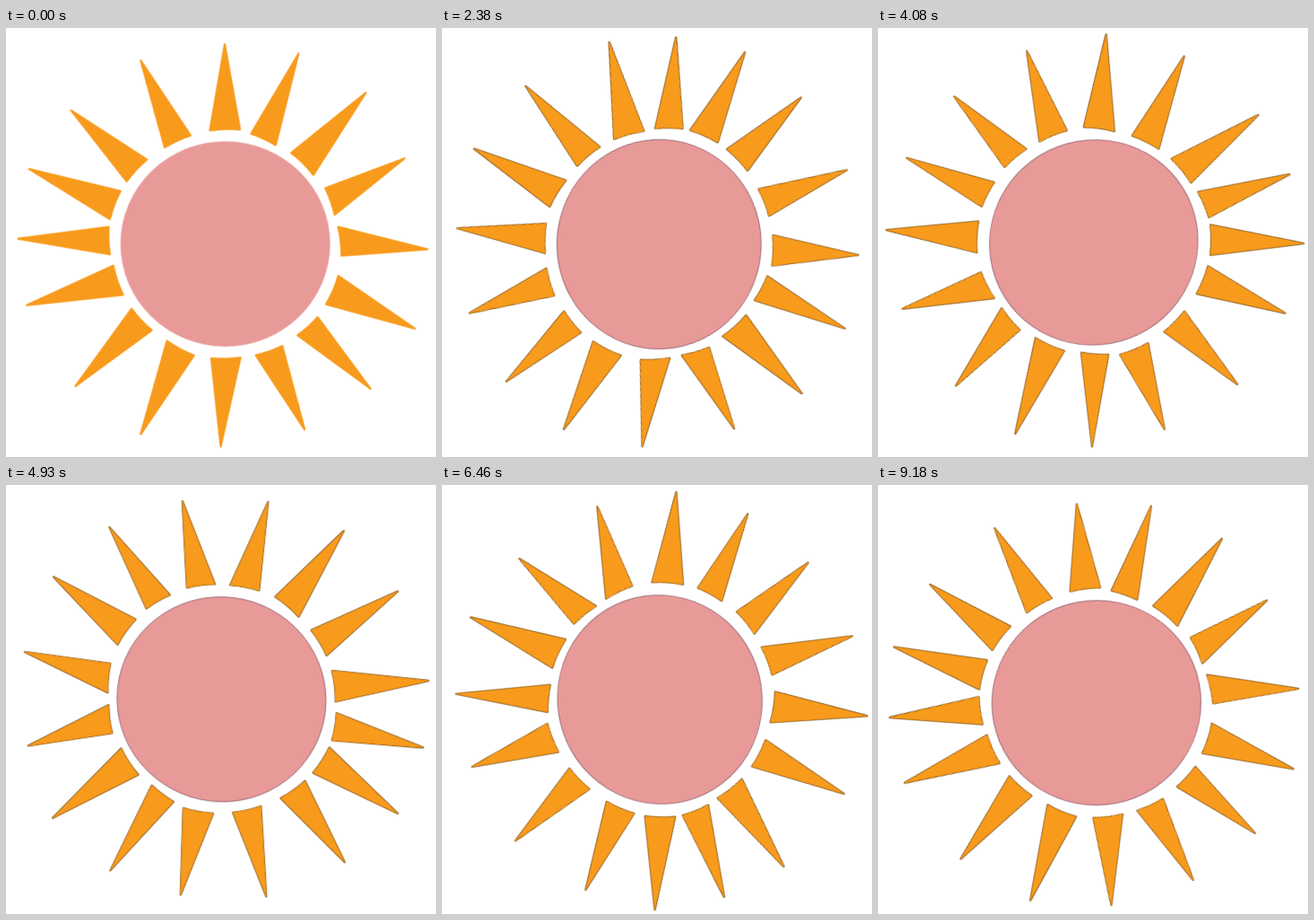
An HTML page without scripts for the animation above (9.35 s loop, 480x478 px).

```html
<!DOCTYPE html>
<html lang="en">
<head>
<meta charset="utf-8">
<title>Turning sun</title>
<style>
  html, body { margin: 0; width: 100%; height: 100%; overflow: hidden; background: #fff; }
  svg { display: block; width: 100%; height: 100%; }

  .sun { --orange: #f89b1c; --pink: #e89a99; animation: turn 9350ms -1ms infinite; }
  .rays { fill: var(--orange); stroke: var(--orange); stroke-width: .9; stroke-linejoin: round; }
  .edge { stroke: #70450f; stroke-width: 2.1; }
  .disc { fill: var(--pink); stroke: #7d4a58; stroke-width: .7; }
  .edge, .disc { animation: bare 9350ms -1ms step-end infinite; }
  .edge { --bare: var(--orange); }
  .disc { --bare: var(--pink); }

  /* One turn in 55 held poses, with a slight wobble of the centre. */
  @keyframes turn {
    0%        { transform: translate(244.3px, 241.3px) rotate(-192deg);  animation-timing-function: steps(8); }
    14.54545% { transform: translate(242.5px, 243.4px) rotate(-139deg);  animation-timing-function: steps(11); }
    34.54545% { transform: translate(240.9px, 238px) rotate(-65.2deg);   animation-timing-function: steps(10); }
    52.72727% { transform: translate(241.2px, 238.2px) rotate(0deg);     animation-timing-function: steps(9); }
    69.09091% { transform: translate(244px, 239.3px) rotate(58.5deg);    animation-timing-function: steps(7); }
    81.81818% { transform: translate(243.8px, 243px) rotate(105.5deg);   animation-timing-function: steps(9); }
    98.18182% { transform: translate(243.4px, 243.4px) rotate(162.5deg); animation-timing-function: steps(1); }
    100%      { transform: translate(244.3px, 241.3px) rotate(168deg); }
  }

  /* The first pose has no dark outline. */
  @keyframes bare {
    0% { stroke: var(--bare); }
    1.81818% { animation-timing-function: step-end; }
  }
  .edge { animation-name: bare-rays; }
  .disc { animation-name: bare-disc; }
  @keyframes bare-rays { 0% { stroke: #f89b1c; } 1.81818%, 100% { stroke: #70450f; } }
  @keyframes bare-disc { 0% { stroke: #e89a99; } 1.81818%, 100% { stroke: #7d4a58; } }
</style>
</head>
<body>
<svg viewBox="0 0 480 478" preserveAspectRatio="none">
  <defs>
    <g id="rays" transform="scale(1.006)">
      <path d="M9 -126 L51 -218 L41 -120 A127 127 0 0 0 9 -126Z"/>
      <path d="M59 -113 L135 -186 L85 -91 A127 127 0 0 0 59 -113Z"/>
      <path d="M99 -76 L195 -119 L116 -48 A127 127 0 0 0 99 -76Z"/>
      <path d="M122 -31 L229 -20 L126 3 A127 127 0 0 0 122 -31Z"/>
      <path d="M127 16 L223 54 L122 46 A127 127 0 0 0 127 16Z"/>
      <path d="M119 54 L195 127 L101 82 A127 127 0 0 0 119 54Z"/>
      <path d="M92 91 L136 181 L65 110 A127 127 0 0 0 92 91Z"/>
      <path d="M43 119 L49 219 L12 126 A127 127 0 0 0 43 119Z"/>
      <path d="M-10 127 L-46 217 L-43 121 A127 127 0 0 0 -10 127Z"/>
      <path d="M-54 114 L-124 190 L-78 96 A127 127 0 0 0 -54 114Z"/>
      <path d="M-93 84 L-188 132 L-112 55 A127 127 0 0 0 -93 84Z"/>
      <path d="M-122 38 L-215 52 L-126 7 A127 127 0 0 0 -122 38Z"/>
      <path d="M-127 -7 L-219 -52 L-124 -39 A127 127 0 0 0 -127 -7Z"/>
      <path d="M-116 -60 L-187 -135 L-96 -88 A127 127 0 0 0 -116 -60Z"/>
      <path d="M-84 -100 L-125 -190 L-58 -115 A127 127 0 0 0 -84 -100Z"/>
      <path d="M-39 -123 L-44 -219 L-8 -127 A127 127 0 0 0 -39 -123Z"/>
    </g>
  </defs>
  <g class="sun">
    <use class="rays edge" href="#rays"/>
    <use class="rays" href="#rays"/>
    <ellipse class="disc" cx="-.5" cy=".7" rx="116.7" ry="114" transform="rotate(12)"/>
  </g>
</svg>
</body>
</html>
```
